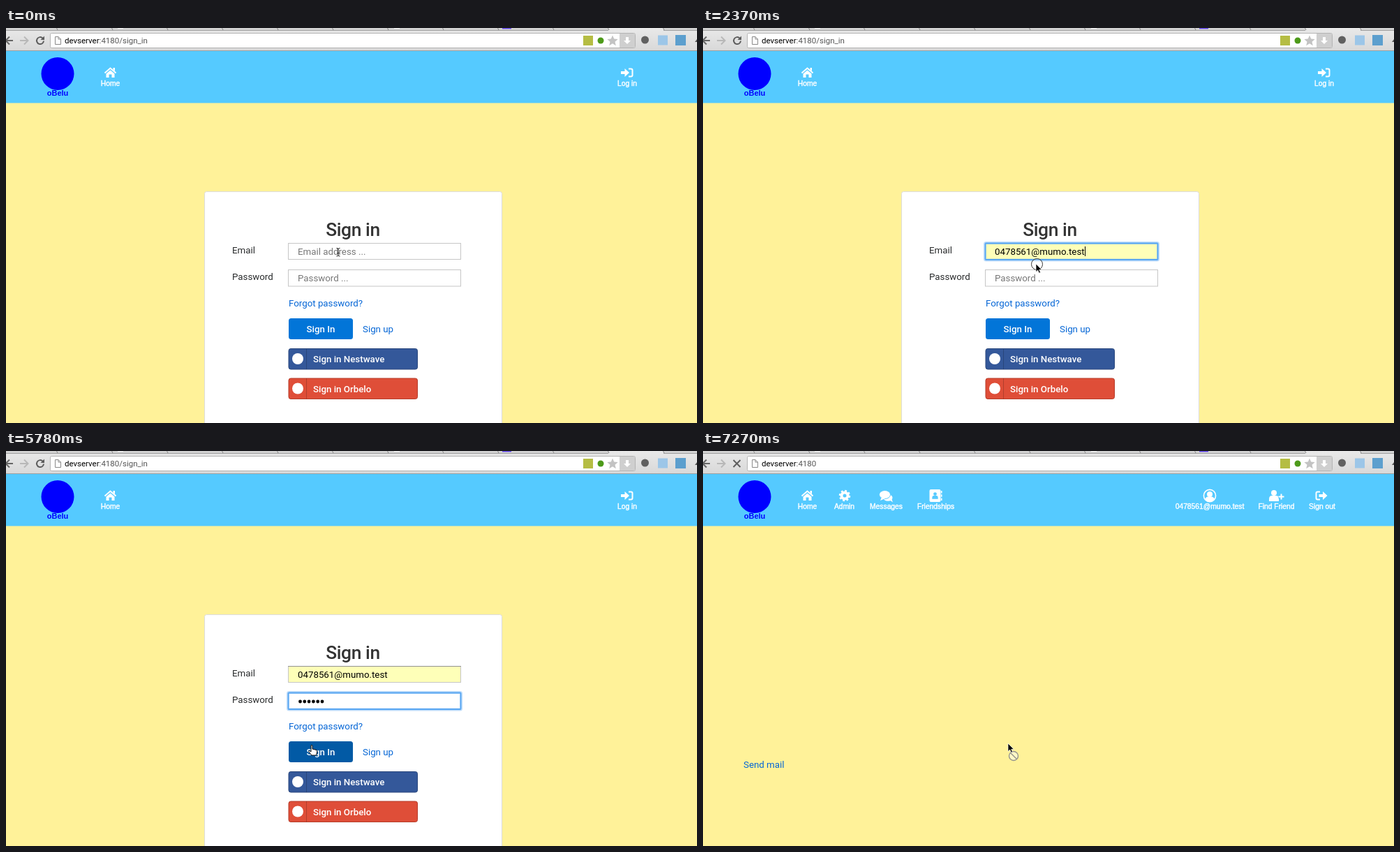
Recreate the animation shown at these times as an HTML page. Size 990 px wide and 566 px high, loop 8000 ms.

```html
<!DOCTYPE html>
<html lang="en">
<head>
<meta charset="utf-8">
<title>Sign in</title>
<style>
  html, body { margin: 0; width: 100%; height: 100%; overflow: hidden; background: #fff299; }
  svg { display: block; width: 100%; height: 100%; }
  text { font: 13.3px Roboto, sans-serif; fill: #292b2c; white-space: pre; }
  .link { fill: #0566d6; }
  .hint { fill: #777; }
  .typed { fill: #000; }
  .button { fill: #fff; font-weight: 500; }
  .title { font-size: 26.4px; font-weight: 500; letter-spacing: -.4px; fill: #333; text-anchor: middle; }
  .address { font-size: 11.5px; fill: #555; }
  .address .host { fill: #000; }
  .suggestion { font: 700 10px Inter, sans-serif; fill: #000; }
  .nav text { font: 10.3px "Liberation Sans", Arial, sans-serif; fill: #fff; stroke: #fff; stroke-width: .4px; text-anchor: middle; }
  .brand { font: 700 11px "Liberation Sans", Arial, sans-serif; fill: #00f; text-anchor: middle; }
  .line { fill: none; stroke: #fff; }
  .field { fill: #fff; stroke: #c6c6c6; }
</style>
</head>
<body>
<svg viewBox="0 0 990 566">
  <defs>
    <linearGradient id="chrome" x2="0" y2="1">
      <stop stop-color="#e9e9e9"/><stop offset="1" stop-color="#d9d9d9"/>
    </linearGradient>
    <path id="door" class="line" stroke-width="2" d="M2 -5.5H5.5Q7.5 -5.5 7.5 -3.5V3.5Q7.5 5.5 5.5 5.5H2"/>
    <path id="dart" fill="#fff" d="M-8 -2H-2.5V-6L4 0 -2.5 6V2H-8Z"/>
    <g id="person"><circle cy="-4" r="4"/><path d="M-7 8V5Q-7 0 -3 0H3Q7 0 7 5V8Z"/></g>
  </defs>

  <rect width="990" height="566" fill="#fff299"/>

  <!-- browser bar -->
  <rect width="990" height="32" fill="url(#chrome)"/>
  <rect width="863" height="3" fill="#d2d2d2"/>
  <rect x="942" width="48" height="3" fill="#d2d2d2"/>
  <path d="M0 3.5H863M942 3.5H990M0 32.5H990" stroke="#a0a0a0"/>
  <g id="tabs" stroke="#888"></g>
  <path d="M160 0h8v1h-8zM556 0h8v1h-8z" fill="#fff"/>
  <rect x="711" width="13" height="1.3" fill="#5b3df0"/>
  <g fill="none" stroke-width="2">
    <path d="M10 18H0M5 12.5L-.5 18 5 23.5" stroke="#666"/>
    <path d="M20 18H31M26 12.5L31.5 18 26 23.5" stroke="#b8b8b8"/>
    <g id="reload"><path d="M52.5 14.5A5 5 0 1 0 54 18.5" stroke="#5c5c5c"/><path d="M55 11.5V17H49.5Z" fill="#5c5c5c" stroke="none"/></g>
    <path id="stop" d="M43.5 13L53.5 23M53.5 13L43.5 23" stroke="#5c5c5c"/>
  </g>
  <rect x="63.5" y="7.5" width="838" height="21" rx="2" fill="#fff" stroke="#b4b4b4"/>
  <path d="M70.5 12.5H75L78.5 16V23.5H70.5ZM75 12.5V16H78.5" fill="#fff" stroke="#8a8a8a"/>
  <text class="address" x="84" y="22"><tspan class="host">devserver</tspan>:4180<tspan id="path">/sign_in</tspan></text>
  <rect id="badge" x="827" y="11" width="14" height="14" fill="#b5bd43"/>
  <circle cx="852" cy="18" r="4.5" fill="#4d9a1a"/>
  <path d="M869 10.5L871.2 15.6 876.7 16.1 872.5 19.8 873.8 25.2 869 22.3 864.2 25.2 865.5 19.8 861.3 16.1 866.8 15.6Z" fill="#c3c3c3"/>
  <rect x="879" y="8" width="22" height="20" fill="#cfcfcf"/>
  <path d="M888 13H892V18H895L890 23 885 18H888Z" fill="#fff"/>
  <circle cx="915.5" cy="17" r="5.5" fill="#606060"/>
  <rect x="934" y="10.5" width="14" height="14" fill="#9cc6e8"/>
  <rect x="959" y="10" width="15" height="15" fill="#5c9fce"/>
  <path d="M987 20L990 16V20Z" fill="#555"/>

  <!-- site header -->
  <rect y="33" width="990" height="74.5" fill="#55caff"/>
  <circle cx="74" cy="65.5" r="23.5" fill="#00f"/>
  <text class="brand" x="74" y="97">oBelu</text>
  <g class="nav" fill="#fff">
    <path class="line" stroke-width="2" d="M141.5 64.5L149.5 57.5 157.5 64.5"/>
    <path d="M153.5 57H156V62L153.5 60ZM149.5 60.5L155.5 65.5V71H151.5V66.5H147.5V71H143.5V65.5Z"/>
    <text x="149.5" y="83">Home</text>
    <g id="guest">
      <use href="#dart" x="889" y="64"/><use href="#door" x="890" y="64"/>
      <text x="890" y="83">Log in</text>
    </g>
    <g id="member">
      <circle cx="203" cy="64" r="4.5" class="line" stroke-width="4"/>
      <circle cx="203" cy="64" r="7" class="line" stroke-width="2.5" stroke-dasharray="2.75"/>
      <text x="202.5" y="83">Admin</text>
      <ellipse cx="265" cy="67" rx="6.5" ry="4.8"/><path d="M267 70L272 73.5 270 68Z"/>
      <ellipse cx="260.5" cy="62.5" rx="8" ry="6" stroke="#55caff"/><path d="M256 66L254 71 261 68Z"/>
      <text x="262.5" y="83">Messages</text>
      <rect x="324.5" y="55" width="16" height="18" rx="2"/>
      <path d="M341 57h1.5v3.5h-1.5zM341 62.2h1.5v3.5h-1.5zM341 67.5h1.5v3.5h-1.5z"/>
      <use href="#person" transform="translate(332.5 64) scale(.6)" fill="#55caff"/>
      <text x="333.5" y="83">Friendships</text>
      <circle cx="726" cy="64" r="8.6" class="line" stroke-width="1.6"/>
      <circle cx="726" cy="62" r="4"/>
      <path d="M719 69.5Q720 66 723 65.5H729Q732 66 733 69.5Q726 75.5 719 69.5Z"/>
      <text x="726" y="83" class="account"></text>
      <use href="#person" x="818" y="64"/>
      <path d="M828.5 61V70M824 65.5H833" stroke="#55caff" stroke-width="4"/>
      <path class="line" stroke-width="2" d="M828.5 61.5V69.5M824.5 65.5H832.5"/>
      <text x="821.5" y="83">Find Friend</text>
      <use href="#door" transform="translate(886 64) scale(-1 1)"/><use href="#dart" x="890.5" y="64"/>
      <text x="887" y="83">Sign out</text>
    </g>
  </g>
  <text id="send" class="link" x="58" y="454">Send mail</text>

  <!-- sign-in card -->
  <g id="card">
    <rect x="284.5" y="234.5" width="426" height="340" rx="3" fill="#fff" stroke="#dcdcdc"/>
    <text class="title" x="497" y="297.5">Sign in</text>
    <text x="324" y="323">Email</text>
    <text x="324" y="361">Password</text>

    <rect id="mailBox" class="field" x="404.5" y="308.5" width="247" height="23"/>
    <path id="shade" d="M404 308.5H652" stroke="#929292"/>
    <text id="mailHint" class="hint" x="418" y="325">Email address ...</text>
    <text id="mail" class="typed" x="418" y="325"></text>
    <rect class="field" x="404.5" y="346.5" width="247" height="23.5"/>
    <text id="passHint" class="hint" x="418" y="363">Password ...</text>
    <g id="dots"></g>

    <g id="ring" fill="none" stroke="#5aa7f2">
      <rect x="404" y="308" width="248" height="24.5" rx="1.5" stroke-width="4" opacity=".4"/>
      <rect x="404.5" y="308.5" width="247" height="23.5" rx="1" stroke-width="1.8"/>
    </g>
    <rect id="caret" width="1" height="14"/>

    <g id="menu">
      <rect id="menuBox" x="404.5" y="333" width="247" height="20" stroke="#a3c9ec"/>
      <text class="suggestion account" x="412" y="348"></text>
    </g>

    <text id="forgot" class="link" x="405" y="398.5">Forgot password?</text>
    <rect id="submit" x="405" y="416" width="92" height="30" rx="3.5"/>
    <text class="button" x="430.5" y="436">Sign In</text>
    <text class="link" x="511" y="436">Sign up</text>
    <rect x="405" y="459.5" width="184.5" height="29.5" rx="3" fill="#34589a" stroke="#2a477c"/>
    <rect x="405" y="502" width="184.5" height="29.5" rx="3" fill="#df4e38" stroke="#b53c2a"/>
    <path d="M430.5 460V489M430.5 502V531.5" stroke="#000" opacity=".2"/>
    <circle cx="418" cy="474" r="8" fill="#fff"/>
    <circle cx="418" cy="516.5" r="8" fill="#fff"/>
    <text class="button" x="440" y="479">Sign in Nestwave</text>
    <text class="button" x="440" y="522">Sign in Orbelo</text>
  </g>

  <!-- pointer -->
  <g id="pointer">
    <circle id="click" cx="1.5" cy=".5" r="8" fill="#fff" fill-opacity=".3" stroke="#333"/>
    <path id="beam" d="M-2.5 -5.5Q0 -5.5 0 -4 0 -5.5 2.5 -5.5M0 -4V4.5M-2.5 6Q0 6 0 4.5 0 6 2.5 6M-1.5 1.5H1.5" fill="none" stroke="#222"/>
    <g id="wait" fill="#fff" fill-opacity=".45" stroke="#94948c" stroke-width="1.4">
      <circle cx="8" cy="18" r="6.5"/><path d="M3.5 13.5L12.5 22.5"/>
    </g>
    <path id="arrow" d="M0 0V11.5L2.7 9 4.5 13.2 6.5 12.3 4.7 8.3H8.3Z" stroke="#fff" stroke-width=".7"/>
    <path id="hand" d="M-1 0Q0 -1.5 1 0V5L7 6.5Q8 7 7.5 10L6.5 14H0L-4.5 8.5Q-4 6.5 -1 9Z" fill="#fff" stroke="#111"/>
  </g>
</svg>

<script>
const LOOP = 8000;
const ACCOUNT = '0478561@mumo.test';
const $ = id => document.getElementById(id);
const show = (id, on) => { $(id).style.display = on ? '' : 'none'; };

// Each step changes only the listed parts of the state.
const steps = [
  [0, { mail: '', focus: '', caret: 0, dots: 0, button: '#0275d8', path: 1, badge: 1, kind: 'beam', at: [476, 321] }],
  [150, { focus: 'mail', caret: 1 }],
  [600, { caret: 0 }],
  [890, { mail: '0', menu: 1, caret: 1, kind: '' }],
  [1040, { mail: '09'.replace('9', '4') }],
  [1490, { caret: 0, kind: 'beam', at: [476, 325] }],
  [1630, { at: [476, 332] }],
  [1780, { mail: ACCOUNT, filled: 1, lit: 1, kind: 'arrow', at: [476, 336] }],
  [1920, { at: [477, 338] }],
  [2070, { click: 1 }],
  [2370, { menu: 0, caret: 1 }],
  [2520, { click: 0, at: [476, 341] }],
  [2660, { kind: 'beam', at: [474, 350] }],
  [2810, { at: [471, 355] }],
  [3110, { focus: 'pass', click: 1 }],
  [3250, { click: 0 }],
  [3550, { caret: 0 }],
  [3700, { dots: 1, caret: 1 }],
  [4000, { dots: 2 }],
  [4300, { dots: 3 }],
  [4590, { dots: 4 }],
  [4740, { dots: 5 }],
  [5040, { dots: 6 }],
  [5490, { caret: 0, at: [462, 362] }],
  [5640, { kind: 'hand', at: [447, 394], forgot: 1 }],
  [5780, { forgot: 0, button: '#025aa5', at: [438, 422] }],
  [6070, { focus: '', click: 1 }],
  [6220, { click: 0, button: '#51a2e6', loading: 1, kind: 'arrow', at: [437, 419] }],
  [6520, { path: 0, badge: 0 }],
  [6820, { member: 1 }],
  [6970, { badge: 1 }],
  [7120, { send: 1 }]
];

function stateAt(time) {
  return Object.assign({}, ...steps.filter(([start]) => start <= time).map(([, change]) => change));
}

function draw(s) {
  const onPass = s.focus === 'pass';
  $('mail').textContent = s.mail;
  $('mailBox').style.fill = s.filled ? '#feffb8' : '#fff';
  show('mailHint', !s.mail);
  show('shade', s.filled && s.focus !== 'mail');
  show('passHint', !s.dots);
  [...$('dots').children].forEach((dot, i) => { dot.style.display = i < s.dots ? '' : 'none'; });

  show('ring', s.focus);
  $('ring').setAttribute('transform', `translate(0 ${onPass ? 38 : 0})`);
  show('caret', s.caret && s.focus);
  const advance = onPass ? s.dots * 6.3 : s.mail ? $('mail').getComputedTextLength() : 0;
  $('caret').setAttribute('x', Math.round(418 + advance));
  $('caret').setAttribute('y', onPass ? 351 : 313);

  show('menu', s.menu);
  $('menuBox').style.fill = s.lit ? '#e4e4e4' : '#fff';
  $('forgot').style.textDecoration = s.forgot ? 'underline' : 'none';
  $('submit').style.fill = s.button;

  show('reload', !s.loading);
  show('stop', s.loading);
  show('path', s.path);
  show('badge', s.badge);
  show('card', !s.member);
  show('guest', !s.member);
  show('member', s.member);
  show('send', s.send);

  for (const kind of ['beam', 'arrow', 'hand']) show(kind, s.kind === kind);
  show('click', s.click);
  show('wait', s.loading);
  $('pointer').setAttribute('transform', `translate(${s.at})`);
}

function add(parent, tag, attributes) {
  const node = document.createElementNS(parent.namespaceURI, tag);
  for (const name in attributes) node.setAttribute(name, attributes[name]);
  parent.append(node);
}

for (let i = 0; i < 12; i++) add($('tabs'), 'path', { d: `M${72.5 + i * 79} 0l1.5 3` });
for (let i = 0; i < 6; i++) add($('dots'), 'circle', { cx: 421.5 + i * 6.3, cy: 359, r: 2.4 });
document.querySelectorAll('.account').forEach(node => { node.textContent = ACCOUNT; });

function tick() {
  draw(stateAt(performance.now() % LOOP));
  requestAnimationFrame(tick);
}
tick();
</script>
</body>
</html>
```
